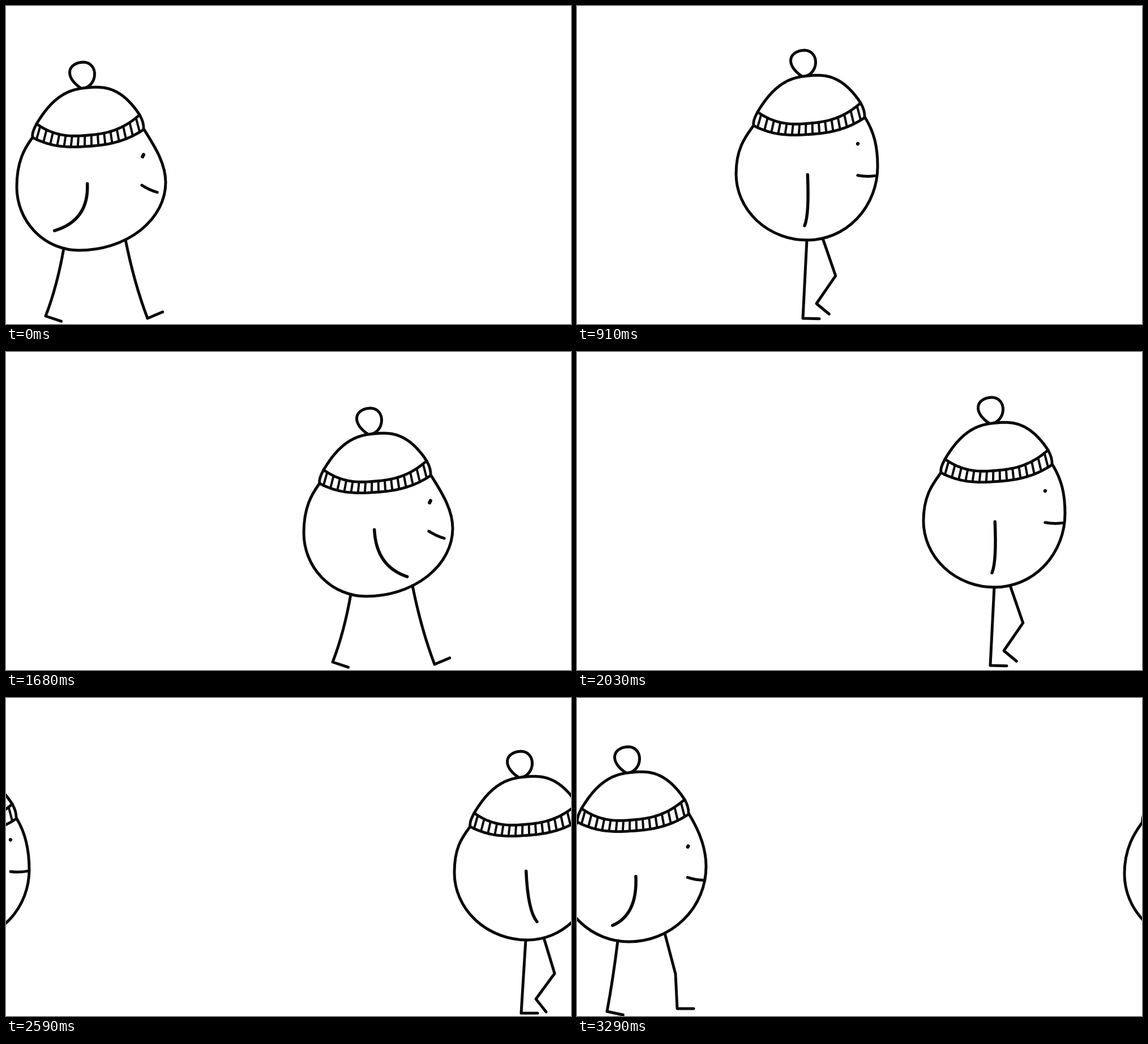
An HTML page with a canvas for the animation above (3360 ms loop, 998 by 561 pixels).

```html
<!DOCTYPE html>
<html lang="en">
<head>
<meta charset="utf-8">
<title>Walk</title>
<style>
html, body { margin: 0; width: 100%; height: 100%; overflow: hidden; background: #fff; }
canvas { display: block; }
</style>
</head>
<body>
<canvas width="998" height="561"></canvas>
<script>
const ctx = document.querySelector('canvas').getContext('2d');
const W = 998, H = 561, TICK = 70, STEP = 8;

// Key poses, measured from the top of the hat, which sits at `at` within a step.
// left, low, right: extremes of the egg. Legs: hip x, heel x, heel y, knee bend, foot angle.
// tilt: turn of the face. arm: swing from -1 (trailing) to 1 (leading).
const contact = {
  at: [0, 146], left: [-115, 173], low: [-5, 285], right: [148, 165],
  stand: [77, 116, 405, -3, -0.4], swing: [-32, -64, 401, 3, 0.32],
  eye: [108, 118], tilt: [0.43], arm: [-1]
};
const down = {
  at: [84, 139], left: [-112, 170], low: [18, 298], right: [140, 165],
  stand: [4, 33, 417, 19, -0.03], swing: [-5, -58, 393, 0, 0.68],
  eye: [107, 112], tilt: [0.19], arm: [-0.27]
};
const passLow = {
  at: [116, 139], left: [-115, 167], low: [14, 286], right: [132, 162],
  stand: [11, 3, 415, 0, 0], swing: [43, 29, 390, 27, 0.9],
  eye: [99, 109], tilt: [-0.03], arm: [0.33]
};
const passHigh = {
  at: [116, 127], left: [-118, 171], low: [8, 288], right: [132, 158],
  stand: [7, 0, 426, 0, 0.03], swing: [35, 24, 400, 29, 0.69],
  eye: [97, 118], tilt: [0.03], arm: [0.09]
};
const reach = {
  at: [137, 129], left: [-119, 177], low: [4, 297], right: [140, 164],
  stand: [-16, -35, 420, 1, 0.21], swing: [67, 89, 415, 7, 0],
  eye: [108, 129], tilt: [0.17], arm: [0.71]
};

const times = [0, 2, 5, 7];
const startX = [134, 310, 460, 641, 791, 976];
const drift = [0, -2, 2, 0, 2, 4];
const SLIDE = 27;

function poseAt(tick) {
  const step = Math.floor(tick / STEP), t = tick % STEP, odd = step % 2;
  const keys = [contact, down, odd ? passHigh : passLow, reach];
  const i = times.findLastIndex(k => k <= t);
  const a = keys[i], b = keys[i + 1] || a;
  const f = (t - times[i]) / (times[i + 1] - times[i]) || 0;
  const pose = {};
  for (const part in a) pose[part] = a[part].map((v, n) => v + (b[part][n] - v) * f);
  pose.at[0] += startX[step] - (odd && t ? SLIDE : 0);
  pose.at[1] += drift[step];
  if (odd) pose.arm[0] *= -1;
  return pose;
}

function stroke(width) {
  ctx.lineWidth = width;
  ctx.stroke();
}

function curve(x0, y0, cx, cy, x1, y1, width) {
  ctx.beginPath();
  ctx.moveTo(x0, y0);
  ctx.quadraticCurveTo(cx, cy, x1, y1);
  stroke(width);
}

// A flat-topped arc between two ends, sagging (or rising) by `sag`.
const arch = (x0, y0, x1, y1, sag) => u =>
  [x0 + (x1 - x0) * u, y0 + (y1 - y0) * u + sag * (1 - Math.abs(2 * u - 1) ** 2.6)];
const crown = arch(-80, 62, 102, 46, -56);
const brimTop = arch(-80, 62, 102, 46, 28);
const brimLow = arch(-87, 86, 109, 72, 22.5);

function trace(path, back) {
  for (let i = 0; i <= 60; i++) ctx.lineTo(...path(back ? 1 - i / 60 : i / 60));
}

function drawHat() {
  ctx.beginPath();
  ctx.moveTo(0, 0);
  ctx.bezierCurveTo(-32, -20, -26, -46, 3, -47);
  ctx.bezierCurveTo(30, -46, 29, -4, 0, 0);
  stroke(5);

  ctx.beginPath();
  trace(crown);
  ctx.fill();
  stroke(5);

  ctx.beginPath();
  trace(brimTop);
  ctx.quadraticCurveTo(110, 60, 109, 72);
  trace(brimLow, true);
  ctx.quadraticCurveTo(-89, 78, -80, 62);
  ctx.fill();
  stroke(4.8);

  for (let i = 0; i < 16; i++) {
    const u = 0.035 + i * 0.062;
    ctx.beginPath();
    ctx.moveTo(...brimTop(u));
    ctx.lineTo(...brimLow(u));
    stroke(4);
  }
}

function drawBody({ left: [lx, ly], low: [bx, by], right: [rx, ry] }) {
  ctx.beginPath();
  ctx.moveTo(-88, 87);
  ctx.bezierCurveTo(-101, 105, lx, ly - 45, lx, ly);
  ctx.ellipse(bx, ly, bx - lx, by - ly, 0, Math.PI, Math.PI / 2, true);
  ctx.ellipse(bx, ry, rx - bx, by - ry, 0, Math.PI / 2, 0, true);
  ctx.bezierCurveTo(rx, ry - 35, 126, 98, 110, 72);
  stroke(5);
}

function drawLeg([hipX, heelX, heelY, bend, angle], { left, low, right }) {
  // The hip lies on the underside of the egg.
  const side = hipX < low[0] ? left : right;
  const across = (hipX - low[0]) / (side[0] - low[0]);
  const hipY = side[1] + (low[1] - side[1]) * Math.sqrt(1 - across * across);
  const dx = heelX - hipX, dy = heelY - hipY, len = Math.hypot(dx, dy);
  const soft = Math.abs(bend) < 5, push = (soft ? 2 : 1) * bend / len;
  const kneeX = hipX + dx * 0.55 + dy * push, kneeY = hipY + dy * 0.55 - dx * push;
  ctx.beginPath();
  ctx.moveTo(hipX, hipY);
  if (soft) ctx.quadraticCurveTo(kneeX, kneeY, heelX, heelY);
  else {
    ctx.lineTo(kneeX, kneeY);
    ctx.lineTo(heelX, heelY);
  }
  ctx.lineTo(heelX + 29 * Math.cos(angle), heelY + 29 * Math.sin(angle));
  stroke(5);
}

function drawFace({ eye: [x, y], tilt: [tilt], arm: [arm] }) {
  ctx.beginPath();
  ctx.moveTo(x + tilt * 2, y - tilt * 4);
  ctx.lineTo(x - tilt * 2, y + tilt * 4 + 0.1);
  stroke(6.2);

  const mx = x - tilt * 5, my = y + 56 - tilt * 9;
  const dx = 30 * Math.cos(tilt), dy = 30 * Math.sin(tilt);
  curve(mx, my, mx + dx / 2, my + dy / 2 + 2.5, mx + dx, my + dy, 5);

  const sx = x - 88 - tilt * 24, sy = y + 55 - tilt * 13;
  const reachY = 90 - 7 * arm * arm;
  curve(sx, sy, sx + 3, sy + reachY * 0.78, sx + 58 * arm, sy + reachY, 5.5);
}

function drawWalker(pose, shift) {
  ctx.save();
  ctx.translate(pose.at[0] + shift, pose.at[1]);
  drawLeg(pose.stand, pose);
  drawLeg(pose.swing, pose);
  drawBody(pose);
  drawFace(pose);
  drawHat();
  ctx.restore();
}

ctx.lineCap = ctx.lineJoin = 'round';
ctx.strokeStyle = '#080808';
ctx.fillStyle = '#fff';

function frame() {
  const pose = poseAt(Math.floor(performance.now() / TICK) % (STEP * startX.length));
  ctx.fillRect(0, 0, W, H);
  drawWalker(pose, 0);
  drawWalker(pose, -W);
  requestAnimationFrame(frame);
}
frame();
</script>
</body>
</html>
```
